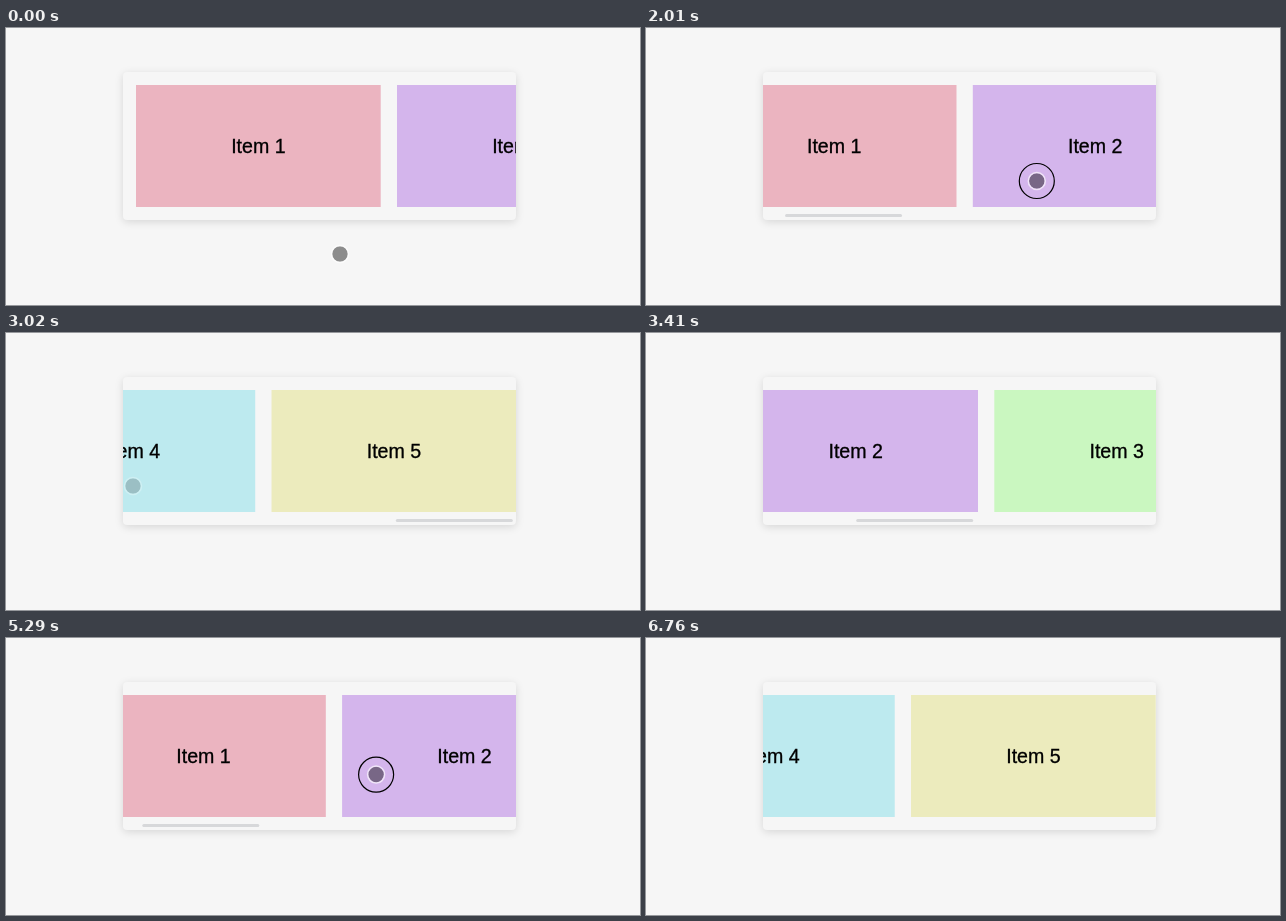
Animation, 634 px wide and 277 px high, one loop 6.84 s. Source, as an HTML page:

```html
<!DOCTYPE html>
<html lang="en">
<head>
<meta charset="utf-8">
<title>Drag scroller</title>
<style>
  html, body { margin: 0; width: 100%; height: 100%; overflow: hidden; background: #f6f6f6; }
  svg { display: block; position: absolute; left: 0; top: 0; }
  .panel {
    position: absolute; left: 117px; top: 43.5px; width: 393px; height: 148.5px;
    border-radius: 4px; background: #f6f6f6; box-shadow: 0 2px 8px rgba(0, 0, 0, .13);
  }
  text {
    font: 19.6px "Liberation Sans", Arial, sans-serif; text-anchor: middle;
    stroke: #000; stroke-width: .3px;
  }
</style>
</head>
<body>
<div class="panel"></div>
<svg width="634" height="277" viewBox="0 0 634 277">
  <defs>
    <clipPath id="view"><rect x="117" y="43.5" width="393" height="148.5" rx="4"/></clipPath>
  </defs>
  <g clip-path="url(#view)">
    <g id="track"></g>
    <rect id="thumb" y="186" width="117" height="3" rx="1.5" fill="#d7d8da"/>
  </g>
  <g id="cursor">
    <circle r="7.8" fill="#000" fill-opacity=".43"/>
    <circle r="8.5" fill="none" stroke="#fff" stroke-opacity=".65" stroke-width="1.5"/>
    <circle id="ring" r="17.5" fill="none" stroke="#000" stroke-width="1.2"/>
  </g>
</svg>
<script>
const LOOP = 6840;
const TICK = 77.9;
const SKIP_EVERY = 4.62;
const MAX_SCROLL = 909;
const COLORS = ['#ebb4c0', '#d4b5ec', '#caf7c0', '#bdeaef', '#ecebbd'];

const SWIPE = { press: 1780, start: 1850, release: 2250, length: 328 };
const FLING = { press: 5130, start: 5130, release: 5605, length: 416 };
const REWIND = 3322;
const RETURN = 4030;

const $ = id => document.getElementById(id);
const mod = (a, n) => ((a % n) + n) % n;
const ramp = (t, a, b) => Math.min(1, Math.max(0, (t - a) / (b - a)));
const easeOut = p => 1 - (1 - p) ** 2;
const glide = (from, to, elapsed, tau) => to + (from - to) * Math.exp(-elapsed / tau);
const dragged = (t, d) => d.length * ramp(t, d.start, d.release) ** 1.75;
const holds = (t, d) => t >= d.press && t < d.release;

// The picture advances in even ticks and rests on a regular share of them.
function snap(time) {
  let n = Math.floor((time - 48) / TICK);
  if (mod(4.1 - n, SKIP_EVERY) < 1) n--;
  return Math.max(0, 60 + n * TICK);
}

function pointerAt(t) {
  if (t < RETURN) {
    const rise = easeOut(ramp(t, 1070, 1540));
    return [334 + 121 * rise - dragged(t, SWIPE), 226 - 73 * rise];
  }
  const approach = easeOut(ramp(t, 4270, 4970));
  return [575.5 - 150.5 * approach - dragged(t, FLING), 136.6];
}

function scrollAt(t) {
  if (t < SWIPE.release) return dragged(t, SWIPE);
  if (t < REWIND) return glide(SWIPE.length, MAX_SCROLL, t - SWIPE.release, 110);
  if (t < FLING.start) return glide(MAX_SCROLL, 0, t - REWIND, 80);
  if (t < FLING.release) return dragged(t, FLING);
  return glide(FLING.length, MAX_SCROLL, t - FLING.release, 120);
}

const cursorAlpha = t => 1 - ramp(t, 2800, 3180) + ramp(t, RETURN, 4200) - ramp(t, 5830, 6370);
const thumbAlpha = t => ramp(t, 1850, 1930) - ramp(t, 4270, 4590)
  + ramp(t, 5050, 5180) - ramp(t, 6100, 6370);

$('track').innerHTML = COLORS.map((color, i) => {
  const x = 130 + 261 * i;
  return `<rect x="${x}" y="57" width="244.7" height="122" fill="${color}"/>` +
    `<text x="${x + 122.4}" y="124.5">Item ${i + 1}</text>`;
}).join('');

function draw(time) {
  const t = snap(time);
  const [x, y] = pointerAt(t);
  const scroll = scrollAt(t);
  const pressed = holds(t, SWIPE) || holds(t, FLING);
  $('track').setAttribute('transform', `translate(${-scroll} 0)`);
  $('thumb').setAttribute('x', 120 + 270 * scroll / MAX_SCROLL);
  $('thumb').setAttribute('opacity', thumbAlpha(t));
  $('cursor').setAttribute('transform', `translate(${x} ${y})`);
  $('cursor').setAttribute('opacity', cursorAlpha(t));
  $('ring').setAttribute('visibility', pressed ? 'visible' : 'hidden');
}

const begin = performance.now();
function tick() {
  draw((performance.now() - begin) % LOOP);
  requestAnimationFrame(tick);
}
tick();
</script>
</body>
</html>
```
